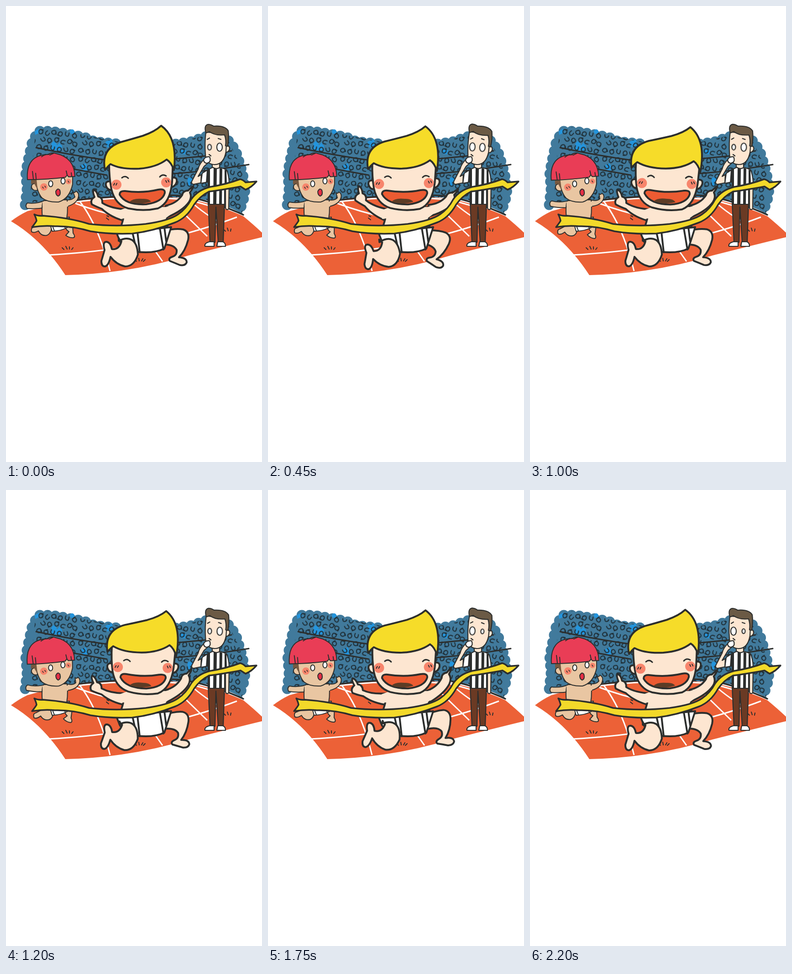
Write an HTML page without scripts that moves like this. It is 561 px wide and 998 px high and loops after 2.25 s.

```html
<!DOCTYPE html>
<html lang="en">
<head>
<meta charset="utf-8">
<title>Finish line</title>
<style>
@property --swing { syntax: '<number>'; inherits: true; initial-value: 0; }
@property --lean { syntax: '<number>'; inherits: true; initial-value: 0; }
@property --nod { syntax: '<number>'; inherits: true; initial-value: 0; }
html, body { margin: 0; width: 100%; height: 100%; overflow: hidden; background: #fff; }
svg {
  display: block; width: 100%; height: 100%;
  animation: swing 2.25s infinite, lean 2.25s infinite, nod 2.25s infinite;
}
/* limbs of the winner */
@keyframes swing {
  0% { --swing: 0; animation-timing-function: steps(9); }
  20% { --swing: -.85; animation-timing-function: steps(2); }
  24.444% { --swing: -1; animation-timing-function: steps(5); }
  35.556% { --swing: -.42; animation-timing-function: steps(4); }
  44.444% { --swing: .02; animation-timing-function: steps(8); }
  62.222% { --swing: .88; animation-timing-function: steps(5); }
  73.333% { --swing: 1; animation-timing-function: steps(2); }
  77.778% { --swing: .98; animation-timing-function: steps(9); }
  97.778% { --swing: .05; animation-timing-function: steps(1); }
  100% { --swing: 0; }
}
/* winner's head and the runner-up */
@keyframes lean {
  0% { --lean: 0; animation-timing-function: steps(9); }
  20% { --lean: .42; animation-timing-function: steps(7); }
  35.556% { --lean: .83; animation-timing-function: steps(4); }
  44.444% { --lean: .98; animation-timing-function: steps(2); }
  48.889% { --lean: 1; animation-timing-function: steps(6); }
  62.222% { --lean: .83; animation-timing-function: steps(7); }
  77.778% { --lean: .45; animation-timing-function: steps(9); }
  97.778% { --lean: .02; animation-timing-function: steps(1); }
  100% { --lean: 0; }
}
/* referee's head */
@keyframes nod {
  0%, 48.889% { --nod: 0; animation-timing-function: steps(11); }
  24.444%, 73.333% { --nod: 1; animation-timing-function: steps(11); }
  97.778%, 100% { --nod: 0; }
}
@keyframes eyeL {
  0%, 26.6%, 100% { transform: scale(.68); }
  11.1%, 73.3% { transform: none; }
}
@keyframes eyeR { 0% { transform: none; } 73.3%, 100% { transform: scale(.58); } }
.eyeL, .eyeR { transform-box: fill-box; transform-origin: center; vector-effect: non-scaling-stroke; }
.eyeL { animation: eyeL 2.25s step-end infinite; }
.eyeR { animation: eyeR 2.25s step-end infinite; }

.armL { transform-origin: 262px 458px; transform: rotate(calc(var(--swing) * -8deg)); }
.armR { transform-origin: 365px 450px; transform: rotate(calc(var(--swing) * -8.5deg)); }
.legL { transform-origin: 272px 540px; transform: rotate(calc(var(--swing) * 7.5deg)); }
.legR { transform-origin: 352px 502px; transform: rotate(calc(var(--swing) * -13deg)); }
.head { transform-origin: 298px 440px; transform: rotate(calc(var(--lean) * 3.8deg)); }
.kidHead { transform-origin: 112px 400px; transform: rotate(calc(var(--lean) * -1.2deg)); }
.kidArmL { transform-origin: 85px 432px; transform: rotate(calc(var(--lean) * 7deg)); }
.kidArmR { transform-origin: 132px 430px; transform: rotate(calc(var(--lean) * 12deg)); }
.kidLegL { transform-origin: 95px 475px; transform: translate(calc(var(--lean) * 3px), 0) rotate(calc(var(--lean) * -7deg)); }
.kidLegR { transform-origin: 135px 475px; transform: rotate(calc(var(--lean) * 12deg)); }
.refHead { transform-origin: 459px 345px; transform: rotate(calc(var(--nod) * 3.6deg)); }

.ink { stroke: #2c2e2d; stroke-linecap: round; stroke-linejoin: round; }
.line { fill: none; }
.skin { fill: #fde6d1; }
.tan { fill: #e9c6a2; }
.white { fill: #fff; }
.blush { fill: #f7856c; stroke: none; }
</style>
</head>
<body>
<svg viewBox="0 0 561 998">
<defs>
  <path id="fan" d="M5 -4Q-4 -6 -4 0T1 5Q6 3 4 -3L0 -4"/>
  <path id="arc" d="M-3 -4Q-6 3 -1 5T4 -2"/>
  <pattern id="crowd" width="92" height="52" patternUnits="userSpaceOnUse" patternTransform="rotate(5)">
    <g fill="none" stroke="#1f3039" stroke-width="2.2" stroke-linecap="round">
      <use href="#fan" x="8" y="7"/>
      <use href="#arc" transform="translate(23 9) rotate(30)"/>
      <use href="#fan" transform="translate(37 6) rotate(80)"/>
      <use href="#fan" transform="translate(51 9) rotate(200)"/>
      <use href="#arc" x="66" y="7"/>
      <use href="#fan" transform="translate(82 10) rotate(-40)"/>
      <use href="#arc" transform="translate(14 23) rotate(-50)"/>
      <use href="#fan" transform="translate(29 25) rotate(150)"/>
      <use href="#fan" x="44" y="22"/>
      <use href="#arc" transform="translate(59 26) rotate(90)"/>
      <use href="#fan" transform="translate(73 23) rotate(40)"/>
      <use href="#fan" transform="translate(85 28) rotate(110)"/>
      <use href="#fan" transform="translate(7 40) rotate(60)"/>
      <use href="#fan" transform="translate(22 42) rotate(-20)"/>
      <use href="#arc" x="37" y="40"/>
      <use href="#fan" transform="translate(52 43) rotate(170)"/>
      <use href="#arc" transform="translate(66 41) rotate(-30)"/>
      <use href="#fan" transform="translate(80 44) rotate(20)"/>
    </g>
  </pattern>
</defs>

<!-- stands -->
<g stroke-linejoin="round">
  <path fill="#417a9c" d="M68 273L100 271 140 279 172 286 195 292 250 300 300 330 372 299 405 294 440 283 488 293 503 315 514 350 521 375 524 410 514 445 519 455Q460 424 400 419H200Q150 422 38 440L46 400 43 365 50 330 55 300Z"/>
  <path d="M42 435L46 400 43 365 50 330 57 300 70 274 100 274 140 281 172 287 195 297 250 302M372 302L405 297 440 285 488 295 503 315 514 350 521 378 524 412 514 443" fill="none" stroke="#417a9c" stroke-width="23" stroke-linecap="round" stroke-dasharray="0 17"/>
  <g fill="#2494dc">
    <path d="M100 300l7-7 5 12 6-7 3 18H97ZM165 348l10-4 5 14-11 5ZM218 297l14-6 3 14-13 5ZM397 377l11-3 4 16-12 5ZM384 314l11 2-3 9-11-2ZM63 274l10-6 2 9-11 5Z"/>
    <circle cx="145" cy="275" r="5"/><circle cx="118" cy="308" r="5"/>
  </g>
  <path fill="url(#crowd)" d="M66 266L102 264 172 283 252 298 300 330 372 298 440 283 488 296 512 345 522 380 518 452Q460 424 400 419H200L52 430 56 380 60 320Z"/>
</g>
<g class="ink line" stroke-width="3">
  <path d="M66 310Q145 327 226 338M148 357L220 370M366 335L440 328 494 317M366 367Q440 362 532 347"/>
</g>

<!-- track -->
<path fill="#ec6137" d="M11 471Q28 458 47 449Q120 428 200 420Q300 412 400 422Q470 437 520 460Q543 479 561 496V506Q470 528 400 546Q270 586 130 589Q80 512 11 471Z"/>
<g fill="none" stroke="#fff" stroke-width="3">
  <path d="M92 545Q230 537 330 514T506 462M162 428Q204 483 228 580M152 432Q205 452 265 464M373 438L441 504M300 498L343 559M400 424Q440 460 475 476M140 430Q270 413 400 424L470 444"/>
</g>
<path class="ink line" stroke-width="3.5" d="M138 427Q200 418 290 415T400 418Q465 431 520 457"/>
<path class="ink line" stroke-width="2" d="M123 529l4 4M131 526l3 6M139 527l0 5M147 529l-3 4M283 555l3 4M291 552l1 6M300 553l-3 5M305 555l-4 4M477 489l4 4M485 486l2 6M493 488l-1 5M220 464l5 4M221 459l4 2"/>

<!-- referee -->
<g class="ink" stroke-width="2.2">
  <path class="skin" d="M481 384V442Q483 448 488 444L489 384Z"/>
  <path class="skin" d="M452 338V360H468V338Z"/>
  <path fill="#6b3a24" d="M443 430L447 517H458L460 440 465 517H476L479 430Z"/>
  <path class="white" d="M446 516Q434 519 436 526H456V516ZM464 516L462 526H481Q481 518 475 516Z"/>
  <path class="white" d="M441 359L453 353Q461 359 469 353L483 358Q488 368 489 386L479 389V434H443V385L427 388 430 366Z"/>
  <path stroke="none" fill="#2c2e2d" d="M440 360l7-4V434h-4V386l-5 1ZM455 354l7 3-1 77h-7ZM468 354l6 2-1 78h-6ZM479 358l4 1 1 29-5 1Z"/>
  <g class="refHead">
    <path class="skin" d="M481 307Q490 303 490 313 487 322 480 319Z"/>
    <path class="skin" d="M438 276Q435 300 437 325 438 346 456 347 477 348 482 319L484 280Z"/>
    <path fill="#6b5a45" d="M438 278Q433 261 443 259 449 259 455 263 479 261 487 273 489 288 486 307L481 306Q483 293 479 282 457 284 446 275Z"/>
    <path class="line" d="M441 292l5-3M465 290l6 2"/>
    <ellipse class="white eyeL" cx="446" cy="309" rx="6" ry="9"/>
    <ellipse class="white eyeR" cx="468" cy="309" rx="6" ry="9"/>
  </g>
  <path class="skin" d="M435 335Q424 344 421 357L407 384Q406 391 412 390L427 387 428 369 421 373 434 351 443 343Z"/>
  <path class="white" d="M433 337Q436 329 446 330 451 342 440 344 434 344 433 337Z"/>
  <path class="line" d="M445 325l4 3"/>
</g>

<!-- runner-up -->
<g class="ink" stroke-width="2">
  <path class="tan kidLegL" d="M77 478L61 484Q54 485 56 494 61 498 71 492 77 504 89 502 99 499 101 480Z"/>
  <path class="tan kidLegR" d="M127 475Q130 490 138 494L131 502Q139 508 148 507 153 505 147 497L146 480 139 470Z"/>
  <path class="white" d="M94 468L101 493Q122 492 134 485L139 462Z"/>
  <path class="line" d="M102 482l4 10M126 476l4 11"/>
  <path class="tan kidArmL" d="M90 424Q67 434 47 431 41 436 46 443 65 445 88 441Z"/>
  <path class="tan kidArmR" d="M128 424Q145 426 151 418L147 407Q151 410 153 405 160 408 159 416 157 433 130 440Z"/>
  <path class="tan" d="M82 426Q77 438 80 465L90 482 130 478Q137 455 134 424Z"/>
  <path class="tan" stroke="none" d="M80 428H136V439H80Z"/>
  <g class="kidHead">
    <path class="tan" d="M68 388Q55 387 56 397 59 406 71 403Z"/>
    <path class="tan" d="M64 370Q66 406 79 420 91 430 115 429 139 422 146 390V368Z"/>
    <path fill="#76583f" stroke="none" d="M55 380H67L69 400Q65 396 62 388L55 390Z"/>
    <path fill="#e93d56" d="M47 380Q43 326 92 325 101 319 110 323 150 332 151 373L137 374 134 370 130 375Q91 380 47 380Z"/>
    <path class="line" d="M78 330Q86 324 94 325M96 326L105 322M58 362L60 379M65 366L66 378M132 361L134 370M143 365L144 373"/>
    <circle class="blush" cx="83" cy="396" r="8"/><circle class="blush" cx="137" cy="384" r="6"/>
    <path class="line" stroke-width="1.5" d="M80 396l2 3M85 394l2 3M136 383l2 3"/>
    <ellipse class="white" cx="98" cy="389" rx="4.5" ry="6.5"/>
    <ellipse class="white" cx="125" cy="383" rx="4.5" ry="6.5"/>
    <path fill="#e42f45" d="M109 406Q113 397 118 403 121 414 114 416 109 414 109 406Z"/>
  </g>
</g>

<!-- winner -->
<g class="ink" stroke-width="4">
  <path class="skin legR" d="M346 492Q372 486 388 489 403 494 399 512 393 536 379 550 396 551 396 561 393 569 381 567 369 562 359 558 355 552 364 549 375 546 374 534 368 522 346 522Z"/>
  <path class="white" d="M242 496L250 516 288 538Q324 542 347 531L362 484Z"/>
  <path class="line" d="M277 495L286 535M288 494L293 539M337 486L345 533M347 484L351 515"/>
  <path class="skin legL" d="M247 508Q250 514 253 515 248 534 232 532 229 517 220 516 211 516 216 534 212 548 209 558 209 570 217 570 225 568 229 549 242 566 261 570 281 570 289 544 288 520 276 512 264 505 247 514Z"/>
  <path class="skin armL" d="M265 445Q232 444 211 431 212 419 202 417 199 404 192 402 189 406 194 418 184 424 188 434 197 439 210 444 230 463 262 471Z"/>
  <path class="skin armR" d="M350 437Q374 432 386 414 388 404 399 404L410 394Q411 398 403 408 408 418 401 429 388 448 352 463Z"/>
  <path class="skin" d="M260 446Q258 470 248 492L354 482Q350 460 356 440Z"/>
  <path class="skin" stroke="none" d="M249 447L268 440H350L361 437V456L349 465H258L250 466Z"/>
  <g class="head">
    <path class="skin" d="M230 384Q217 382 219 393 223 405 233 402M362 376Q376 373 374 385 371 396 360 397"/>
    <path class="skin" d="M226 345Q226 376 231 401 239 435 268 443 301 450 333 443 360 431 364 385L366 335 300 320Z"/>
    <path fill="#f6dc29" d="M217 359Q207 313 251 298 280 290 300 284 326 275 340 262 377 288 368 359 362 342 352 336 330 353 292 356 252 358 229 346 224 350 217 359Z"/>
    <circle class="blush" cx="242" cy="391" r="11"/><circle class="blush" cx="351" cy="386" r="11"/>
    <path class="line" stroke-width="2" d="M238 388l-2 4M243 388l-2 4M350 382l2 4M355 381l2 4"/>
    <path class="line" stroke-width="3" d="M254 376Q261 370 268 377M337 374Q343 367 351 372"/>
    <path fill="#ec5b32" d="M249 413Q249 404 261 405 299 410 333 402 349 399 348 409 343 429 307 434 262 436 249 413Z"/>
    <path fill="#5c3c26" stroke="none" d="M270 429Q279 420 299 422 313 421 318 428 295 436 270 429Z"/>
  </g>
</g>

<!-- ribbon -->
<path class="ink" fill="#f3d92a" stroke-width="3.5" d="M62 456Q70 460 81 459 138 463 182 477 242 484 306 477 357 470 377 456 395 444 406 423 420 403 447 396 484 390 513 379 519 380 525 386L549 384Q538 397 525 402L514 395Q471 403 445 406 425 416 412 435 396 464 370 474 322 493 277 498 225 500 185 493 145 481 107 482 82 480 57 484 65 474 67 470 66 464 62 456Z"/>
</svg>
</body>
</html>
```
